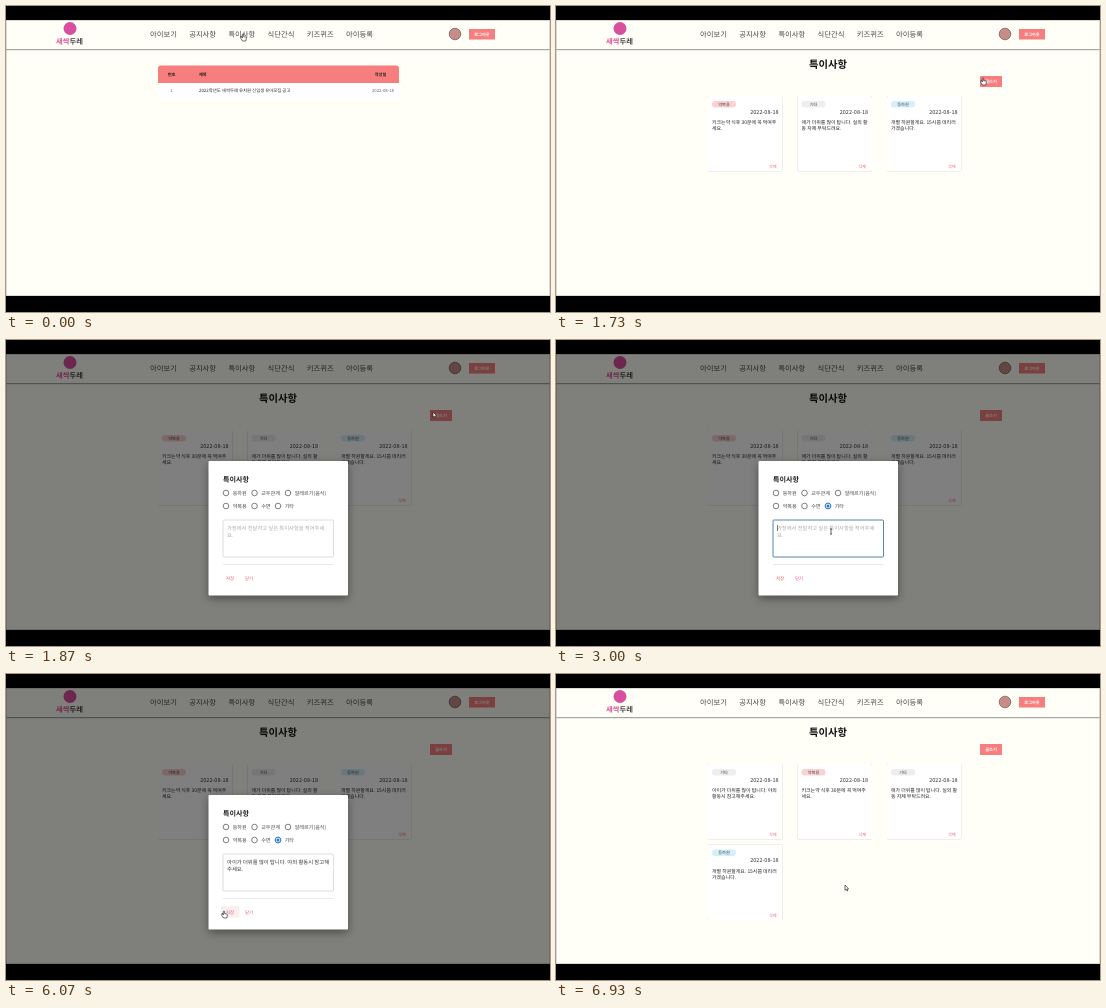
An HTML page that plays this animation: 544x306 px, repeating every 6990 ms.

```html
<!DOCTYPE html>
<html>
<head>
<meta charset="utf-8">
<style>
  html, body { margin: 0; width: 100%; height: 100%; overflow: hidden; background: #000; }
  svg { display: block; width: 100vw; height: 100vh; }
  text { font-family: "Noto Sans CJK KR", "Noto Sans CJK JP", "Noto Sans CJK", sans-serif;
         text-rendering: geometricPrecision; white-space: pre; }
  .raised { filter: drop-shadow(0 .6px .7px #0004); }
</style>
</head>
<body>
<svg id="stage" viewBox="0 0 544 306"></svg>
<script>
const LOOP = 6990;
const CORAL = '#f67e7e';
const INK = '#222';
const stage = document.getElementById('stage');

// Markup helpers
const text = (x, y, size, str, { fill = INK, weight = 400, anchor = 'start', id = '' } = {}) =>
  `<text id="${id}" x="${x}" y="${y}" font-size="${size}" fill="${fill}" font-weight="${weight}" text-anchor="${anchor}">${str}</text>`;
const rect = (x, y, w, h, fill, extra = '') =>
  `<rect x="${x}" y="${y}" width="${w}" height="${h}" fill="${fill}" ${extra}/>`;
const circle = (x, y, r, fill, extra = '') =>
  `<circle cx="${x}" cy="${y}" r="${r}" fill="${fill}" ${extra}/>`;
const group = (id, content) => `<g id="${id}">${content}</g>`;
const button = (x, y, w, h, label, extra) =>
  rect(x, y, w, h, CORAL, extra) +
  text(x + w / 2, y + h / 2 + 1.5, 4.2, label, { fill: '#fff', weight: 700, anchor: 'middle' });

function header() {
  const menu = ['아이보기', '공지사항', '특이사항', '식단간식', '키즈퀴즈', '아이등록'];
  return rect(0, 14, 544, 29, '#fffff8') + rect(0, 43, 544, 1, '#a5a5a1') + rect(0, 44, 544, 1, '#ecece5') +
    circle(64, 22.5, 6.5, '#d94f9f') +
    text(50, 38, 7.3, '새싹', { fill: '#e0529c', weight: 700 }) +
    text(63.5, 38, 7.3, '두레', { fill: '#444', weight: 700 }) +
    menu.map((label, i) => text(144 + i * 39.2, 30.5, 7.3, label, { fill: '#444' })).join('') +
    circle(449, 28, 5.8, '#c88c88', 'stroke="#665656" stroke-width=".7"') +
    button(463, 23, 26, 10.5, '로그아웃');
}

function notices() {
  const bold = { weight: 700 };
  return rect(152, 59.5, 241, 33, '#fff', 'rx="3"') +
    `<path d="M152 77V62.5a3 3 0 0 1 3-3H390a3 3 0 0 1 3 3V77Z" fill="${CORAL}"/>` +
    text(165.5, 69.5, 4.2, '번호', { ...bold, anchor: 'middle' }) +
    text(193, 69.5, 4.2, '제목', bold) +
    text(374.5, 69.5, 4.2, '작성일', { ...bold, anchor: 'middle' }) +
    text(165.5, 86, 4.2, '1', { fill: '#777', anchor: 'middle' }) +
    text(193, 86, 4.4, '2022학년도 새싹두레 유치원 신입생 유아모집 공고', { weight: 500 }) +
    text(388, 86, 4.3, '2022-08-18', { fill: '#666', anchor: 'end' });
}

const CHIP_COLORS = { 약복용: '#fbd2d2', 기타: '#eeeeee', 등하원: '#d6f0fa' };
const NOTES = [
  ['기타', '아이가 더위를 많이 탑니다. 야외', '활동시 참고해주세요.'],
  ['약복용', '키크는약 식후 30분에 꼭 먹여주', '세요.'],
  ['기타', '애가 더위를 많이 탑니다. 실외 활', '동 자제 부탁드려요.'],
  ['등하원', '개별 하원할게요. 15시쯤 데리러', '가겠습니다.'],
];

function card([kind, line1, line2], i) {
  const x = 152 + (i % 3) * 89.5, y = 90 + Math.floor(i / 3) * 80.5;
  return rect(x, y, 74.5, 75.5, '#fff', 'rx="1.5" class="raised"') +
    rect(x + 4, y + 5, 24, 6.5, CHIP_COLORS[kind], 'rx="3.2"') +
    text(x + 16, y + 9.8, 4.2, kind, { fill: '#444', anchor: 'middle' }) +
    text(x + 70.5, y + 17.7, 5.5, '2022-08-18', { fill: '#333', anchor: 'end' }) +
    text(x + 4, y + 28.4, 4.95, line1, { weight: 500 }) +
    text(x + 4, y + 34.2, 4.95, line2, { weight: 500 }) +
    text(x + 61, y + 72.2, 4.2, '삭제', { fill: '#ee6674' });
}

function dialog() {
  const options = [[220, 153, '등하원'], [248.5, 153, '교우관계'], [282, 153, '알레르기(음식)'],
                   [220, 166, '약복용'], [248.5, 166, '수면'], [272, 166, '기타']];
  const hint = { fill: '#aaa' }, action = { fill: '#e6505f', weight: 500 };
  return rect(0, 14, 544, 276, '#000', 'opacity=".5"') +
    rect(202.5, 121, 139.5, 134.5, '#fff', 'rx="1" style="filter:drop-shadow(0 3px 4px #0006)"') +
    text(217, 142, 7.1, '특이사항', { weight: 700 }) +
    options.map(([x, y, label]) =>
      circle(x, y, 2.8, 'none', 'stroke="#555" stroke-width=".75"') +
      text(x + 6.7, y + 2, 5.1, label, { fill: '#444' })).join('') +
    group('picked', circle(272, 166, 2.8, '#fff', 'stroke="#1976d2" stroke-width=".9"') + circle(272, 166, 1.5, '#1976d2')) +
    rect(217, 180, 110.5, 37, 'none', 'id="field" rx="1"') +
    group('hint', text(221, 190, 5.3, '가정에서 전달하고 싶은 특이사항을 적어주세', hint) + text(221, 197, 5.3, '요.', hint)) +
    text(221, 190, 5.35, '', { fill: '#333', id: 'line1' }) +
    text(221, 197, 5.35, '', { fill: '#333', id: 'line2' }) +
    rect(0, 0, .6, 6, '#222', 'id="caret"') +
    rect(217, 224, 110.5, .6, '#ddd') +
    rect(215, 232, 18.5, 11.5, '#f8f0f0', 'id="hover" rx="1"') +
    text(220, 239.6, 4.4, '저장', action) + text(239, 239.6, 4.4, '닫기', action);
}

const pointers = group('pointer',
  '<path id="arrow" d="M0 0V5.2L1.2 4.2 2 6 2.9 5.6 2.1 3.9H3.6Z" fill="#fff" stroke="#111" stroke-width=".6"/>' +
  '<path id="hand" d="M-.7.4Q0-.5.6.4V2.6L3 3.1Q3.6 3.3 3.4 4.2L2.8 7H-.4L-2.2 4.4Q-2-.0 -.7 4Z" fill="#fff" stroke="#111" stroke-width=".6"/>' +
  '<path id="beam" d="M-1-.1H1M0 0V5M-1 5.1H1" fill="none" stroke="#222" stroke-width=".7"/>');

stage.innerHTML =
  rect(0, 0, 544, 306, '#000') + rect(0, 14, 544, 276, '#fffff8') +
  header() + group('notices', notices()) +
  group('board',
    text(272, 61.5, 10.3, '특이사항', { weight: 700, anchor: 'middle', fill: '#111' }) +
    button(424, 70, 22, 11, '글쓰기', 'rx="1" class="raised"') +
    group('before', NOTES.slice(1).map(card).join('')) +
    group('after', NOTES.map(card).join(''))) +
  rect(.25, 14.25, 543.5, 275.5, 'none', 'stroke="#b5b5b0" stroke-width=".5"') +
  group('dialog', dialog()) + pointers;

const el = {};
stage.querySelectorAll('[id]').forEach(node => { if (node.id) el[node.id] = node; });
const show = (node, on) => { node.style.display = on ? '' : 'none'; };

// Every intermediate text while a Korean input method composes the message
function keystrokes(message) {
  const leads = 'ㄱㄲㄴㄷㄸㄹㅁㅂㅃㅅㅆㅇㅈㅉㅊㅋㅌㅍㅎ';
  const tails = ' ㄱㄲㄳㄴㄵㄶㄷㄹㄺㄻㄼㄽㄾㄿㅀㅁㅂㅄㅅㅆㅇㅈㅊㅋㅌㅍㅎ';
  const states = [''];
  let done = '';
  for (const char of message) {
    const code = char.charCodeAt(0) - 0xAC00;
    if (code >= 0) {
      const lead = leads[Math.floor(code / 588)], tail = code % 28;
      const last = done.charCodeAt(done.length - 1);
      const open = last >= 0xAC00 && (last - 0xAC00) % 28 === 0;
      states.push(open ? done.slice(0, -1) + String.fromCharCode(last + tails.indexOf(lead)) : done + lead);
      if (tail) states.push(done + String.fromCharCode(0xAC00 + code - tail));
    }
    done += char;
    states.push(done);
  }
  return states;
}
const typed = keystrokes('아이가 더위를 많이 탑니다. 야외 활동시 참고해주세요.');
const LINE_LENGTH = 26;

// Key points: time followed by values, linear in between
function along(points, t) {
  const next = points.findIndex(p => p[0] > t);
  if (next === 0) return points[0].slice(1);
  if (next < 0) return points[points.length - 1].slice(1);
  const a = points[next - 1], b = points[next], k = (t - a[0]) / (b[0] - a[0]);
  return a.slice(1).map((v, i) => v + (b[i + 1] - v) * k);
}
const POINTER = [[600, 237, 28], [750, 262, 36], [1150, 405, 68], [1400, 427, 72], [1880, 427, 72],
  [2060, 331, 142], [2400, 273, 164], [2760, 272, 164], [2920, 275, 189], [5000, 275, 189],
  [5350, 240, 222], [5720, 218, 237], [6250, 218, 237], [6600, 286, 213], [6930, 289, 211]];
const TYPING = [[3269, 0], [3270, 1], [3470, 1], [4400, 52.1], [4800, 58]];
const FADE = [[1740, 0], [1870, 1], [6180, 1], [6380, 0]];
const KINDS = [[0, 'hand'], [600, 'arrow'], [1370, 'hand'], [1820, 'arrow'], [2390, 'hand'],
  [2850, 'beam'], [5130, 'arrow'], [5700, 'hand'], [6270, 'arrow']];

function draw(t) {
  show(el.notices, t < 600);
  show(el.board, t >= 600);
  show(el.before, t < 6330);
  show(el.after, t >= 6330);

  const [fade] = along(FADE, t);
  show(el.dialog, fade > 0);
  el.dialog.style.opacity = fade;
  show(el.picked, t >= 2530);
  show(el.hover, t >= 5720);

  const focused = t >= 2930 && t < 6000;
  el.field.setAttribute('stroke', focused ? '#3f78a8' : '#c8c8c8');
  el.field.setAttribute('stroke-width', focused ? .9 : .6);

  const message = typed[Math.floor(along(TYPING, t)[0])];
  const rest = message.slice(LINE_LENGTH);
  show(el.hint, !message);
  el.line1.textContent = message.slice(0, LINE_LENGTH);
  el.line2.textContent = rest;

  const line = rest ? el.line2 : el.line1;
  const typing = t >= 3270 && t < 4800;
  show(el.caret, focused && (typing || (t - 2930) % 1060 < 530));
  if (fade > 0) el.caret.setAttribute('x', 221 + (line.textContent ? line.getComputedTextLength() : 0));
  el.caret.setAttribute('y', rest ? 192 : 185);

  const kind = KINDS.filter(k => k[0] <= t).pop()[1];
  for (const name of ['arrow', 'hand', 'beam']) show(el[name], name === kind);
  el.pointer.setAttribute('transform', `translate(${along(POINTER, t)})`);
}

const start = performance.now();
function tick() {
  draw((performance.now() - start) % LOOP);
  requestAnimationFrame(tick);
}
tick();
</script>
</body>
</html>
```
